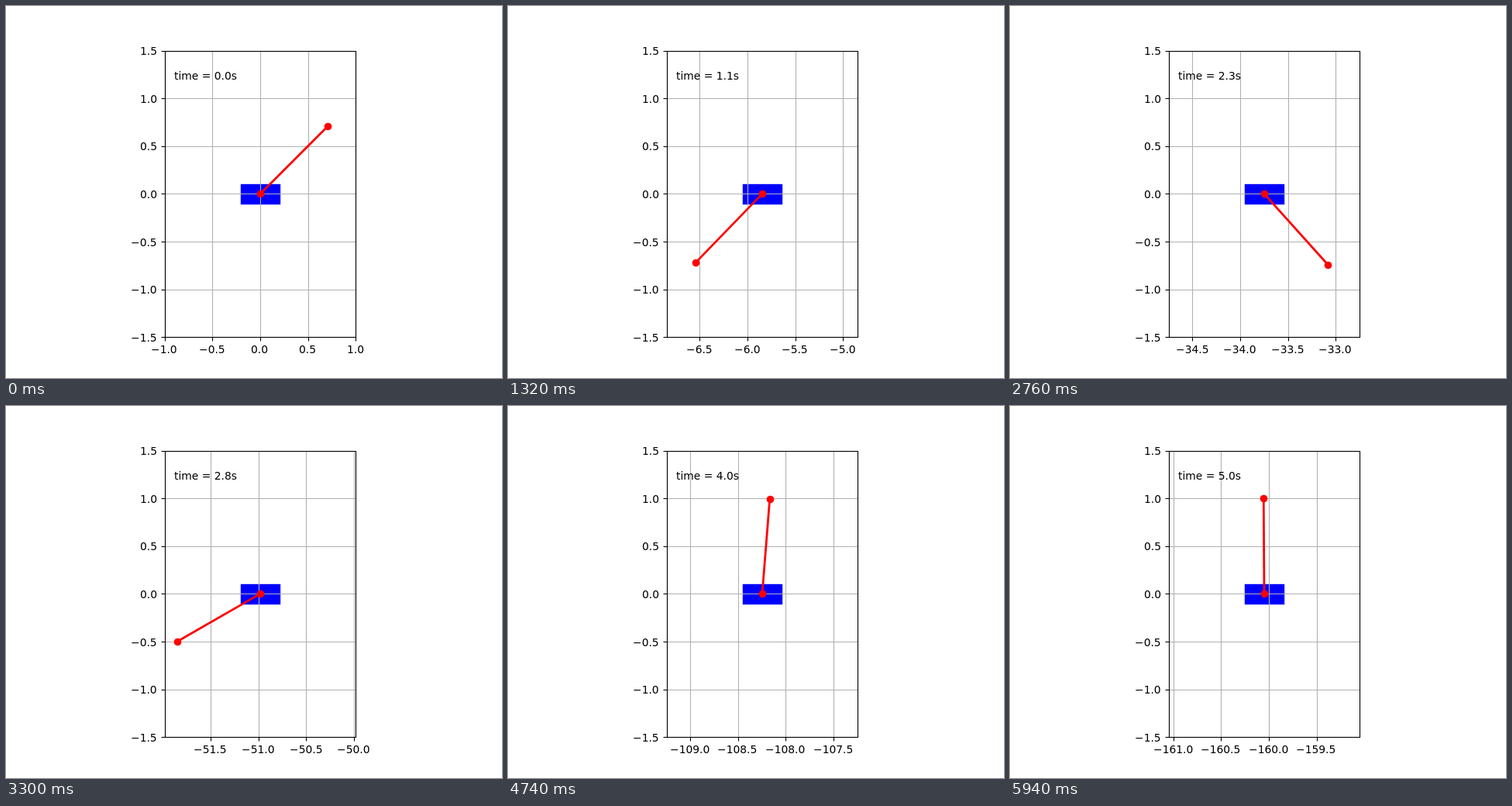
Recreate the animation shown at these times as an HTML page with a canvas. Size 640x480 px, loop 6000 ms.

```html
<!DOCTYPE html>
<html>
<head>
<meta charset="utf-8">
<style>
  html, body { margin: 0; width: 100%; height: 100%; overflow: hidden; background: #fff; }
  canvas { display: block; }
</style>
</head>
<body>
<canvas id="stage" width="640" height="480"></canvas>
<script>
const ctx = document.getElementById('stage').getContext('2d');
const STEP = 60, STEPS = 100, DT = 5 / 99;
const UNIT = 123.2, CX = 328, CY = 242.4, THIN = 1.11;
const LEFT = 205.5, RIGHT = 451.5, TOP = 58.5, BOTTOM = 427.5;

// Cart starts at rest; a smooth spline runs through [step, position]
const cartAt = spline([
  [0, 0], [22, -5.845], [32, -14.1], [46, -33.748], [64, -71.005], [79, -108.245], [99, -160.049]
]);
// Turning points of the pole: [seconds, angle clockwise from upright]
const turns = [[0, 0.785], [0.96, 4.196], [1.84, 0.183], [2.744, 4.2], [3.935, 0.08], [5, -0.006]];

function segment(points, t) {
  let i = 0;
  while (i < points.length - 2 && t > points[i + 1][0]) i++;
  return i;
}

// Cubic spline, clamped at the start and natural at the end, with slopes found by relaxation
function spline(points) {
  const last = points.length - 1, slope = points.map(() => 0);
  const span = i => points[i + 1][0] - points[i][0];
  const mean = i => (points[i + 1][1] - points[i][1]) / span(i);
  for (let pass = 0; pass < 50; pass++) {
    for (let i = 1; i < last; i++) {
      const a = 1 / span(i - 1), b = 1 / span(i);
      slope[i] = (a * (3 * mean(i - 1) - slope[i - 1]) + b * (3 * mean(i) - slope[i + 1])) / (2 * (a + b));
    }
    slope[last] = (3 * mean(last - 1) - slope[last - 1]) / 2;
  }
  return t => {
    const i = segment(points, t), h = span(i), s = (t - points[i][0]) / h, r = 1 - s;
    return r * r * ((1 + 2 * s) * points[i][1] + s * h * slope[i])
      + s * s * ((3 - 2 * s) * points[i + 1][1] - r * h * slope[i + 1]);
  };
}

function poleAt(t) {
  const i = segment(turns, t), [t0, from] = turns[i], [t1, to] = turns[i + 1];
  return from + (to - from) * (1 - Math.cos(Math.PI * (t - t0) / (t1 - t0))) / 2;
}

const snap = v => Math.floor(v + 0.5) + 0.5;
const tickText = v => v.toFixed(1).replace('-', '\u2212');

function line(x0, y0, x1, y1, color, width = THIN) {
  ctx.strokeStyle = color;
  ctx.lineWidth = width;
  ctx.beginPath();
  ctx.moveTo(x0, y0);
  ctx.lineTo(x1, y1);
  ctx.stroke();
}

function text(str, x, y) {
  ctx.fillStyle = '#000';
  ctx.fillText(str, x, y);
}

function dot(x, y) {
  ctx.fillStyle = '#f00';
  ctx.beginPath();
  ctx.arc(snap(x), snap(y), 4.86, 0, 2 * Math.PI);
  ctx.fill();
}

function draw(step) {
  const t = step * DT, cart = cartAt(step), angle = poleAt(t);
  const width = str => ctx.measureText(str).width;
  ctx.fillStyle = '#fff';
  ctx.fillRect(0, 0, 640, 480);
  ctx.font = '13.89px "DejaVu Sans", sans-serif';

  ctx.fillStyle = '#00f';
  ctx.fillRect(302.8, 229.8, 51.4, 26.4);

  for (let k = Math.ceil((cart - 1) * 2); k <= (cart + 1) * 2; k++) {
    const px = CX + (k / 2 - cart) * UNIT, x = snap(px), str = tickText(k / 2);
    line(x, TOP, x, BOTTOM, '#b0b0b0');
    line(x, BOTTOM, x, BOTTOM + 5, '#000');
    text(str, Math.floor(px - width(str) / 2), 448);
  }
  for (let k = -3; k <= 3; k++) {
    const py = CY - k / 2 * UNIT, y = snap(py), str = tickText(k / 2);
    line(LEFT, y, RIGHT, y, '#b0b0b0');
    line(LEFT - 5, y, LEFT, y, '#000');
    text(str, Math.round(195 - width(str)), Math.floor(py) + 6);
  }

  const bobX = CX + Math.sin(angle) * UNIT, bobY = CY - Math.cos(angle) * UNIT;
  line(CX, CY, bobX, bobY, '#f00', 2.78);
  dot(CX, CY);
  dot(bobX, bobY);

  ctx.strokeStyle = '#000';
  ctx.lineWidth = THIN;
  ctx.strokeRect(LEFT, TOP, RIGHT - LEFT, BOTTOM - TOP);
  text(`time = ${t.toFixed(1)}s`, 217, 95);
}

const start = performance.now();
function tick() {
  draw(Math.floor((performance.now() - start) / STEP) % STEPS);
  requestAnimationFrame(tick);
}
tick();
</script>
</body>
</html>
```
